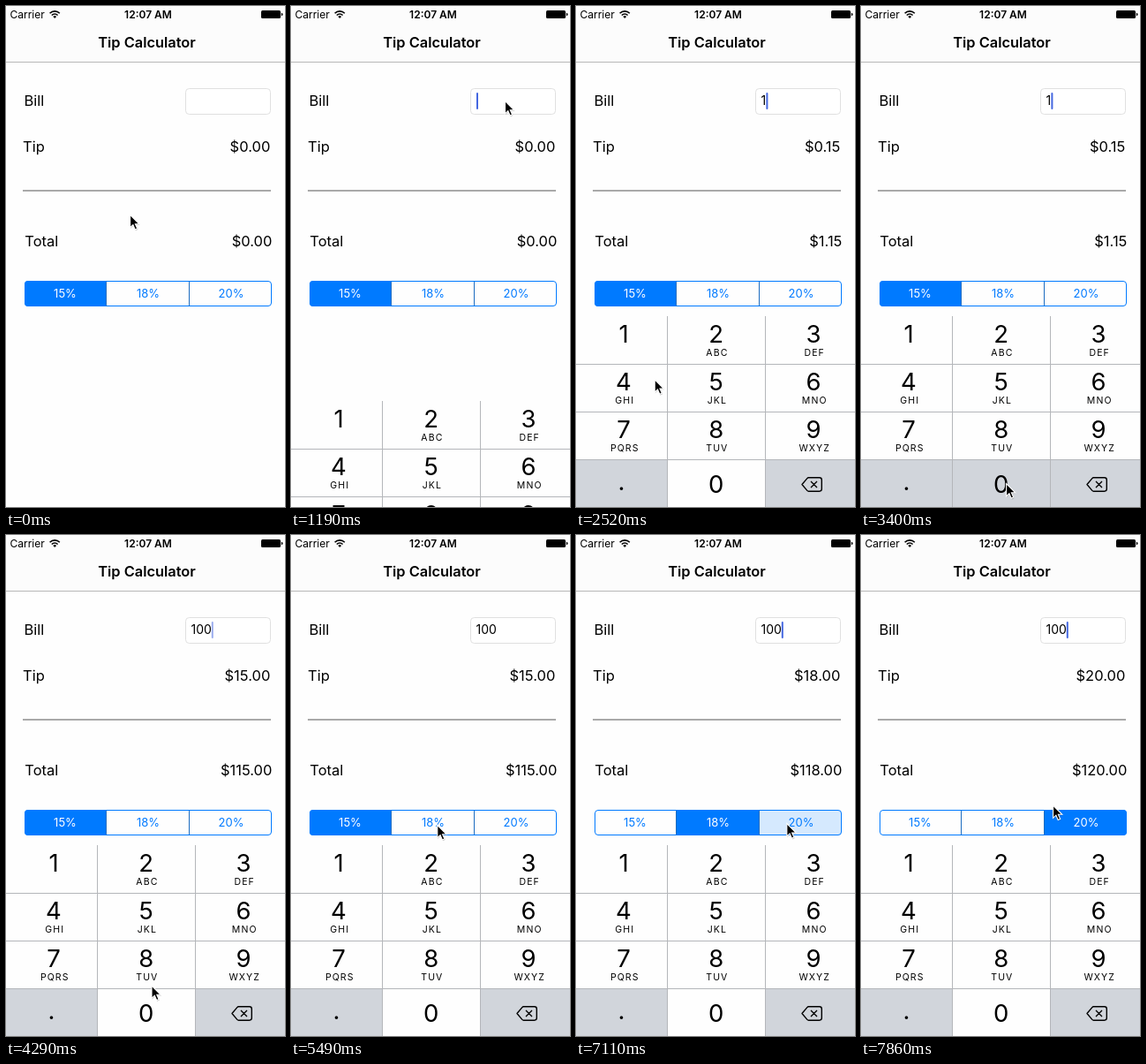
An HTML page that plays this animation: 316 by 567 pixels, repeating every 8 s.

```html
<!DOCTYPE html>
<html lang="en">
<head>
<meta charset="utf-8">
<title>Tip Calculator</title>
<style>
  html, body { margin: 0; width: 100%; height: 100%; overflow: hidden; background: #fefefe; }
  svg { display: block; width: 316px; height: 567px; font-family: Inter, "Liberation Sans", sans-serif; }
  .label { font-size: 16.5px; }
  .end { text-anchor: end; }
  .mid { text-anchor: middle; }
  .bold { font-weight: 600; }
  .status { font-size: 12px; }
  .seg { font-size: 13px; text-anchor: middle; }
  .digit { font-size: 27.5px; text-anchor: middle; }
  .letters { font-size: 10.5px; letter-spacing: 1.1px; text-anchor: middle; }
</style>
</head>
<body>
<svg viewBox="0 0 316 567">
  <rect width="316" height="567" fill="#fefefe"/>
  <rect width="316" height="63" fill="#fcfcfc"/>
  <rect y="63" width="316" height="1" fill="#b8b8b8"/>

  <text class="status" x="4.5" y="14">Carrier</text>
  <g fill="none" stroke="#000" stroke-width="1.6">
    <path d="M49.6 8.2a8 8 0 0 1 11.2 0M51.8 10.5a4.9 4.9 0 0 1 6.8 0"/>
  </g>
  <path d="M53.3 11.9a2.7 2.7 0 0 1 3.8 0L55.2 13.9Z"/>
  <text class="status bold mid" x="161" y="14">12:07 AM</text>
  <rect x="289" y="5" width="22" height="9" rx="1.5"/>
  <path d="M311.8 7.7q1.7 .3 1.7 1.8t-1.7 1.8Z"/>
  <text class="bold mid" x="159.5" y="47" font-size="16.4">Tip Calculator</text>

  <g class="label">
    <text x="20.5" y="112.8">Bill</text>
    <text x="19" y="164.8">Tip</text>
    <text x="21.3" y="271.8">Total</text>
    <text id="tip" class="end" x="299.3" y="164.8"></text>
    <text id="total" class="end" x="301.4" y="271.8"></text>
  </g>
  <rect x="203.5" y="93.5" width="96" height="29" rx="4" fill="#fff" stroke="#e0e0e0"/>
  <text id="bill" x="209.6" y="112.4" font-size="14"></text>
  <rect id="caret" y="98" width="2" height="19" rx="1" fill="#4467e0"/>
  <rect x="19" y="208.3" width="281" height="1.4" fill="#868686"/>

  <clipPath id="round"><rect x="21" y="311" width="280" height="29" rx="4"/></clipPath>
  <g id="segments" clip-path="url(#round)"></g>
  <path d="M113.5 312v27M207.5 312v27" stroke="#1c6cc0"/>
  <rect x="21.5" y="311.5" width="279" height="28" rx="3.5" fill="none" stroke="#007aff"/>

  <g id="keyboard"></g>
  <g id="cursor">
    <path d="M.5 1V15.2L3.8 12.2 6.2 17.6 8.7 16.5 6.4 11.3H10.8Z" fill="#000" opacity=".22" stroke="#000" stroke-opacity=".3"/>
    <path d="M0 0V14.3L3.3 11.2 5.6 16.5 8.1 15.4 5.8 10.3H10.2Z" stroke="#fff" stroke-width="1.1"/>
  </g>
</svg>
<script>
const LOOP = 8000, STEP = 148.3, LAST = 53;
const BLUE = '#007aff', GREY = '#d1d5db';
const RATES = [15, 18, 20];
const $ = id => document.getElementById(id);

// Pointer path: step, x, y
const PATH = [
  [0, 140.6, 236.4], [5, 242.5, 107.5], [11, 242.5, 107.5], [14, 56, 371],
  [16, 56, 371], [22, 164.6, 540.6], [28, 164.6, 540.6], [29, 165, 510],
  [34, 165.8, 328.4], [41, 165.8, 328.4], [47, 239, 327], [51, 238.6, 326.2], [53, 217.6, 306]
];
// Steps at which the entered text changes
const TYPED = [[16, '1'], [24, '10'], [26, '100']];
const CARET_X = [210, 215.4, 224.1, 232.8];
const FOCUS = 6, BLINK = 9;

const EDGES = [21, 113, 207, 301];
$('segments').innerHTML = RATES.map((r, i) =>
  `<rect x="${EDGES[i]}" y="311" width="${EDGES[i + 1] - EDGES[i]}" height="29" fill="${BLUE}"/>
   <text class="seg" x="${67 + 94 * i}" y="330">${r}%</text>`).join('');
const segFills = [...document.querySelectorAll('#segments rect')];
const segTexts = [...document.querySelectorAll('#segments text')];

function buildKeyboard() {
  const cols = [54, 158.7, 269], left = [0, 104, 215, 316];
  const letters = ['', 'ABC', 'DEF', 'GHI', 'JKL', 'MNO', 'PQRS', 'TUV', 'WXYZ'];
  const box = (id, col, row, fill) =>
    `<rect id="${id}" x="${left[col]}" y="${351 + 54 * row}" width="${left[col + 1] - left[col]}" height="54" fill="${fill}"/>`;
  let out = '<rect y="351" width="316" height="216" fill="#fefefe"/>' +
    box('key1', 0, 0, GREY) + box('key0', 1, 3, GREY) +
    box('keyDot', 0, 3, GREY) + box('keyDel', 2, 3, GREY) +
    '<path d="M103.5 351V567M214.5 351V567M0 405.5H316M0 459.5H316M0 513.5H316" stroke="#b4b6ba" fill="none"/>';
  letters.forEach((word, i) => {
    const x = cols[i % 3], y = 381 + 54 * Math.floor(i / 3);
    out += `<text class="digit" x="${x}" y="${y}">${i + 1}</text>
      <text class="letters" x="${x + 1.2}" y="${y + 15}">${word}</text>`;
  });
  out += `<text class="digit" x="${cols[1]}" y="550.5">0</text>
    <text class="digit" x="51.5" y="548">.</text>
    <path d="M263.4 533.8H275.6Q278.3 533.8 278.3 536.4V546.6Q278.3 549.2 275.6 549.2H263.4Q262.5 549.2 261.8 548.4L256 541.5 261.8 534.6Q262.5 533.8 263.4 533.8ZM266 538L273 545M273 538L266 545"
      fill="none" stroke="#000" stroke-width="1.4" stroke-linejoin="round"/>`;
  $('keyboard').innerHTML = out;
}
buildKeyboard();

const clamp = v => Math.max(0, Math.min(1, v));
const easeOut = u => u * (2 - u);
const show = (el, on) => el.setAttribute('opacity', on ? 1 : 0);

function pointer(k) {
  const i = Math.max(1, PATH.findIndex(p => p[0] >= k));
  const [k0, x0, y0] = PATH[i - 1], [k1, x1, y1] = PATH[i];
  const u = easeOut((k - k0) / (k1 - k0));
  return [x0 + (x1 - x0) * u, y0 + (y1 - y0) * u];
}

function caretOpacity(k, reset) {
  if (k < FOCUS) return 0;
  if (k < BLINK) return 1;
  const ms = (k - reset) * STEP % 1000;
  return ms < 700 ? clamp((520 - ms) / 140) : clamp((ms - 830) / 170);
}

function segmentLevel(i, k) {
  const selected = k < 40 ? 0 : k < 49 ? 1 : 2;
  if (i === selected) return 1;
  const touched = (i === 1 && (k === 39 || k === 49)) || (i === 2 && k === 48);
  return touched ? 0.16 : 0;
}

function draw(ms) {
  const k = Math.min(LAST, Math.floor((ms + 12) / STEP));

  const entry = TYPED.filter(e => e[0] <= k).pop() || [BLINK, ''];
  const bill = Number(entry[1]);
  const rate = RATES[k < 40 ? 0 : k < 49 ? 1 : 2];
  const tip = bill * rate / 100;
  $('bill').textContent = entry[1];
  $('tip').textContent = '$' + tip.toFixed(2);
  $('total').textContent = '$' + (bill + tip).toFixed(2);

  $('caret').setAttribute('x', CARET_X[entry[1].length]);
  $('caret').setAttribute('opacity', caretOpacity(k, entry[0]));

  RATES.forEach((r, i) => {
    const level = segmentLevel(i, k);
    segFills[i].setAttribute('opacity', level);
    segTexts[i].setAttribute('fill', level === 1 ? '#fff' : BLUE);
  });

  const slide = 216 * (1 - easeOut(clamp((k - 7) / 3)));
  $('keyboard').setAttribute('transform', `translate(0 ${slide})`);
  show($('key1'), k === 15);
  show($('key0'), k === 23 || k === 25);

  $('cursor').setAttribute('transform', `translate(${pointer(k)})`);
}

const start = performance.now();
function tick() {
  draw((performance.now() - start) % LOOP);
  requestAnimationFrame(tick);
}
tick();
</script>
</body>
</html>
```
